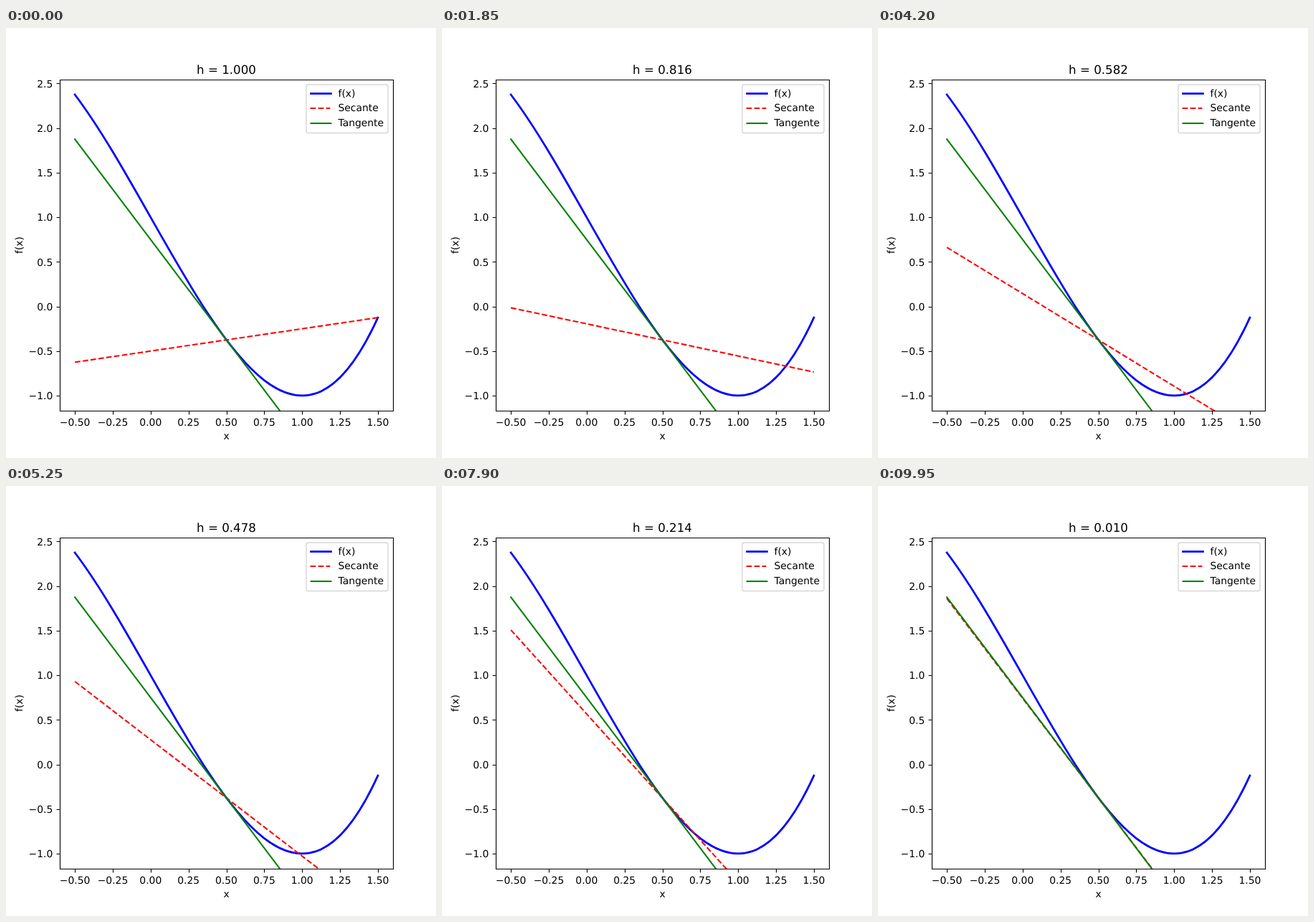
Recreate the animation shown at these times as an HTML page. Size 600x600 px, loop 10000 ms.

```html
<!DOCTYPE html>
<html lang="es">
<head>
<meta charset="utf-8">
<title>Secante y tangente</title>
<style>
  html, body { margin: 0; width: 100%; height: 100%; overflow: hidden; background: #fff; }
  svg { display: block; }
  text { font: 13.889px "DejaVu Sans", sans-serif; text-rendering: geometricPrecision; }
  .title { font-size: 16.667px; }
  .mid { text-anchor: middle; }
  .end { text-anchor: end; }
  path { fill: none; stroke-linecap: square; }
  .curve { stroke: #00f; stroke-width: 2.778; }
  .secant { stroke: #f00; stroke-width: 2.083; stroke-dasharray: 7.708 3.333; stroke-linecap: butt; }
  .tangent { stroke: #008000; stroke-width: 2.083; }
  .axis { stroke: #000; stroke-width: 1.111; stroke-linecap: butt; }
  .legend { fill: #fff; fill-opacity: .8; stroke: #ccc; stroke-opacity: .8; stroke-width: 1.389; }
</style>
</head>
<body>
<svg width="600" height="600" viewBox="0 0 600 600">
  <clipPath id="plot"><rect x="75" y="72" width="465" height="462"/></clipPath>
  <g clip-path="url(#plot)">
    <path id="curve" class="curve"/>
    <path id="secant" class="secant"/>
    <path id="tangent" class="tangent"/>
  </g>
  <path id="axes" class="axis"/>
  <g id="labels"></g>
  <text id="title" class="title mid" x="307.5" y="64"></text>
  <text class="mid" x="307.5" y="574">x</text>
  <text class="mid" transform="translate(23 303) rotate(-90)">f(x)</text>
  <rect class="legend" x="419" y="79" width="114" height="67.5" rx="2.8"/>
  <path class="curve" d="M425.6 91.5h27.8"/>
  <path class="secant" d="M424.6 112h27.8"/>
  <path class="tangent" d="M425.6 133h27.8"/>
  <text x="463.5" y="96">f(x)</text>
  <text x="463.5" y="116">Secante</text>
  <text x="463.5" y="137">Tangente</text>
</svg>
<script>
const LOOP = 10000, STEP = 50, LAST = LOOP / STEP - 1;
const A = -0.5, B = 1.5, X0 = 0.5;
const f = x => x ** 3 - 3 * x + 1;
const df = x => 3 * x * x - 3;
const px = x => 75 + (x + 0.6) * 465 / 2.2;
const py = y => 72 + (2.54375 - y) * 462 / 3.7125;
const point = (x, y) => `${px(x)} ${py(y)}`;
const el = id => document.getElementById(id);

// Straight line through (X0, f(X0)) across the domain
const lineAt = slope => {
  const end = x => point(x, f(X0) + slope * (x - X0));
  return `M${end(A)}L${end(B)}`;
};

// A cubic polynomial is exactly one Bézier segment
const third = (B - A) / 3;
el('curve').setAttribute('d', `M${point(A, f(A))}C${point(A + third, f(A) + df(A) * third)} ` +
  `${point(B - third, f(B) - df(B) * third)} ${point(B, f(B))}`);
el('tangent').setAttribute('d', lineAt(df(X0)));

let axes = 'M75.5 72.5H540.5V534.5H75.5Z', labels = '';
const addLabel = (cls, x, y, value, digits) => {
  labels += `<text class="${cls}" x="${x}" y="${y}">${value.toFixed(digits).replace('-', '\u2212')}</text>`;
};
for (let x = A; x <= B; x += 0.25) {
  axes += `M${Math.round(px(x)) + 0.5} 534.5v5`;
  addLabel('mid', px(x), 555, x, 2);
}
for (let y = -1; y <= 2.5; y += 0.5) {
  axes += `M75.5 ${Math.round(py(y)) + 0.5}h-5`;
  addLabel('end', 65.3, Math.round(py(y) + 5.3), y, 1);
}
el('axes').setAttribute('d', axes);
el('labels').innerHTML = labels;

function draw() {
  const step = Math.floor(performance.now() % LOOP / STEP);
  const h = 1 - 0.99 * step / LAST;
  el('secant').setAttribute('d', lineAt((f(X0 + h) - f(X0)) / h));
  el('title').textContent = `h = ${h.toFixed(3)}`;
  requestAnimationFrame(draw);
}
draw();
</script>
</body>
</html>
```
